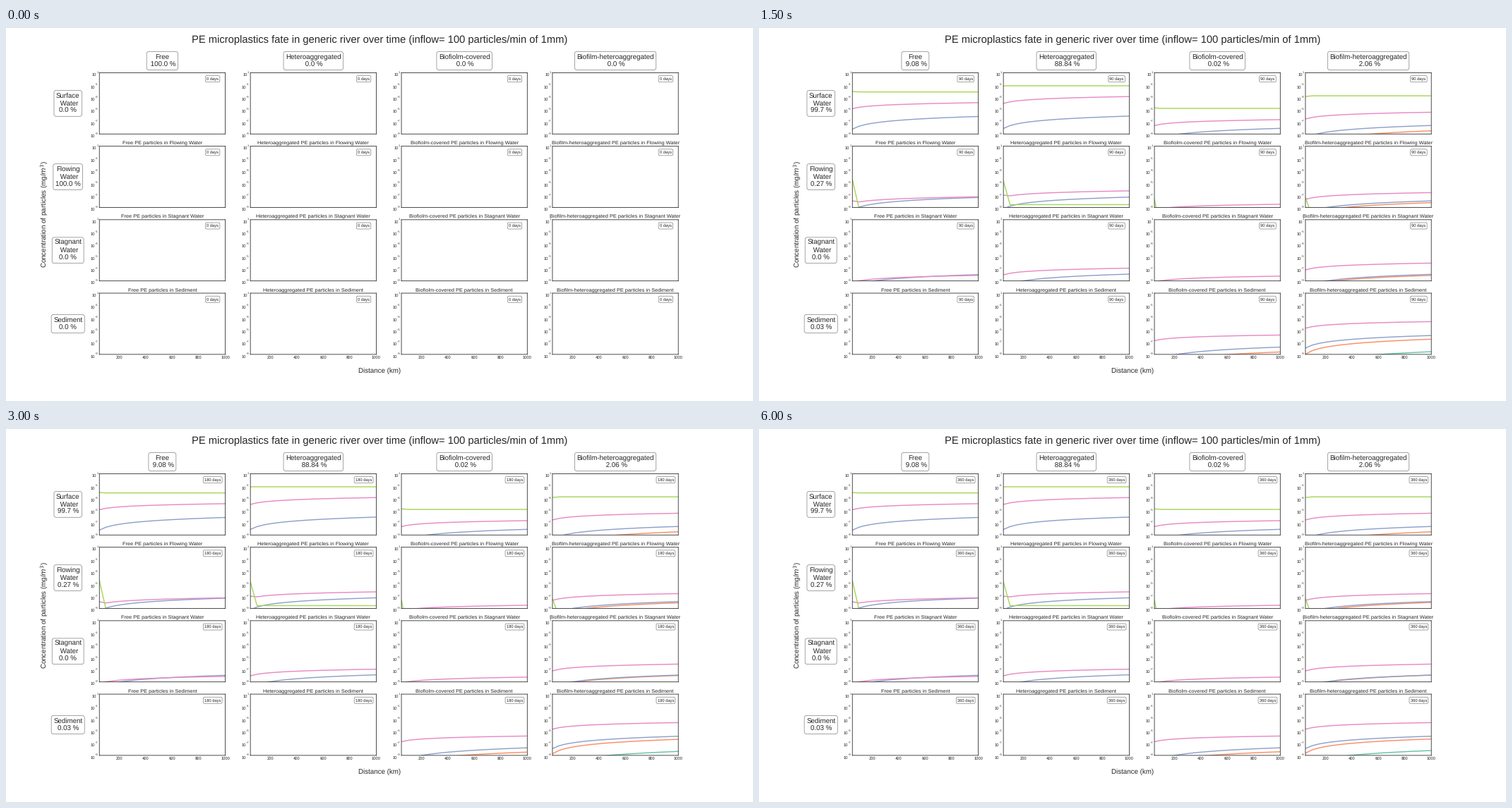
A matplotlib script for the animation above (6500 ms loop, 1058 by 529 pixels).

```python
import numpy as np
import matplotlib.pyplot as plt
from matplotlib.animation import FuncAnimation

plt.rcParams.update({
    "font.family": "Liberation Sans",
    "text.color": "0.15",
    "xtick.labelcolor": "0.15",
    "axes.edgecolor": "0.15",
    "axes.linewidth": 1.0,
    "text.hinting": "none",
    "lines.solid_capstyle": "round",
})

W, H = 1058, 529
DAYS_PER_STEP, STEPS, STEP_MS = 30, 13, 500
KM = np.arange(50, 1001, 50)
DECADES = np.log10(KM / 1000)

COLORS = dict(teal="#66c2a5", orange="#fc8d62", blue="#8da0cb",
              pink="#e78ac3", green="#a6d854")
# Days each size class needs to approach its steady state
TAU = dict(teal=190, orange=93, blue=40)

FORMS = ["Free", "Heteroaggregated", "Biofiolm-covered",
         "Biofilm-heteroaggregated"]
ZONES = ["Surface Water", "Flowing Water", "Stagnant Water", "Sediment"]
# The approach is quicker upstream in water and slower upstream in sediment
UPSTREAM = {"Flowing Water": .5, "Stagnant Water": .5, "Sediment": -.5}
FORM_SHARE = [("100.0", "9.08"), ("0.0", "88.84"), ("0.0", "0.02"),
              ("0.0", "2.06")]
ZONE_SHARE = [("0.0", "99.7"), ("100.0", "0.27"), ("0.0", "0.0"),
              ("0.0", "0.03")]

# log10 concentration: (value at 1000 km, power of distance[, value at 50 km])
CURVES = [
    [dict(blue=(-6.14, 1.59), pink=(-3.89, .75), green=(-2.13, 0, -2.07)),
     dict(blue=(-6.08, 1.55), pink=(-2.89, .86), green=(-1.13, 0)),
     dict(blue=(-8.08, 1.51), pink=(-6.66, .74), green=(-4.82, 0, -4.74)),
     dict(orange=(-8.48, 2.0), blue=(-7.61, 1.6), pink=(-5.45, .84),
          green=(-2.77, 0, -2.88))],
    [dict(blue=(-7.32, 1.6), pink=(-7.26, .84, -7.92),
          green=(-9.15, 0, -4.45)),
     dict(blue=(-7.26, 1.5), pink=(-6.29, .81, -7.0),
          green=(-8.54, 0, -4.68)),
     dict(pink=(-8.48, .69), green=(-12.9, 0, -7.67)),
     dict(orange=(-8.01, 1.8), blue=(-7.88, 1.6), pink=(-6.58, .84),
          green=(-10.5, 0, -7.35))],
    [dict(blue=(-7.92, 1.58), pink=(-8.10, .89)),
     dict(blue=(-7.84, 1.6), pink=(-6.92, .83)),
     dict(pink=(-8.22, .75)),
     dict(orange=(-7.89, 1.7), blue=(-7.88, 1.6), pink=(-6.09, .85))],
    [{},
     {},
     dict(orange=(-8.40, 1.8), blue=(-7.76, 1.8), pink=(-5.84, .71)),
     dict(teal=(-8.14, 1.9), orange=(-6.31, 1.78), blue=(-5.87, 1.55),
          pink=(-3.65, .82))],
]


def profile(end, power, first=None):
    values = end + power * DECADES
    if first is not None:
        values[0] = first
    return values


def boxed(ax, x, y, size):
    box = dict(boxstyle="round,pad=0.3", facecolor="white",
               edgecolor="black", linewidth=.85, alpha=0.5)
    return ax.text(x, y, "", transform=ax.transAxes, fontsize=size,
                   ha="center", va="center", bbox=box)


def power_label(ax, power):
    exponent = str(power).replace("-", "\u2212")
    exponent_width = 4.6 if power < 0 else 2.3
    for text, size, dx, dy in [(exponent, 4.9, 1.8, .5),
                               ("10", 7, 1.8 + exponent_width, 4.7)]:
        ax.annotate(text, (50, power), xytext=(-dx * PX, -dy * PX),
                    textcoords="offset points", fontsize=size,
                    ha="right", va="baseline", annotation_clip=False)


fig, axes = plt.subplots(4, 4, figsize=(18, 9), dpi=W / 18)
PX = 72 / fig.dpi
fig.subplots_adjust(left=.125, right=.9, bottom=.125, top=.88,
                    wspace=.2, hspace=.2)
fig.suptitle("PE microplastics fate in generic river over time "
             "(inflow= 100 particles/min of 1mm)", fontsize=18, y=.981)
fig.text(.5, 1 - 489.4 / H, "Distance (km)", fontsize=12, ha="center")
fig.text(.051, .501, "Concentration of particles (mg/$m^3$)", fontsize=12,
         ha="center", va="center", rotation="vertical")

lines, day_labels = [], []
for r, zone in enumerate(ZONES):
    for c, form in enumerate(FORMS):
        ax = axes[r, c]
        ax.set(xlim=(50, 1000), ylim=(-9, 1), yticks=[],
               xticks=range(200, 1001, 200))
        ax.tick_params(length=0, pad=2 * PX, labelsize=7, labelbottom=r == 3)
        for spine in ax.spines.values():
            spine.set_snap(False)
        for power in range(-9, 2, 2):
            power_label(ax, power)
        if r:
            ax.set_title(f"{form} PE particles in {zone}", fontsize=9,
                         pad=3 * PX)
        for name, color in COLORS.items():
            if name in CURVES[r][c]:
                line, = ax.plot([], [], color=color, lw=1.75, snap=False)
                tau = TAU.get(name) if zone in UPSTREAM else None
                lag = 1 + UPSTREAM.get(zone, 0) * DECADES
                lines.append((line, profile(*CURVES[r][c][name]), tau, lag))
        day_labels.append(boxed(ax, .9, .9, 7))

form_labels = [boxed(ax, .5, 1.196, 12) for ax in axes[0]]
zone_labels = [boxed(ax, -.25, .5, 12) for ax in axes[:, 0]]


def update(step):
    days = step * DAYS_PER_STEP
    started = int(days > 0)
    for line, steady, tau, lag in lines:
        if not started:
            line.set_data([], [])
            continue
        growth = np.log10(1 - np.exp(-days / tau)) if tau else 0
        line.set_data(KM, steady + growth * lag)
    for label in day_labels:
        label.set_text(f"{days} days")
    for label, form, share in zip(form_labels, FORMS, FORM_SHARE):
        label.set_text(f"{form}\n {share[started]} %")
    for label, zone, share in zip(zone_labels, ZONES, ZONE_SHARE):
        label.set_text(zone.replace(" ", "\n ") + f"\n{share[started]} %")
    return []


anim = FuncAnimation(fig, update, frames=STEPS, interval=STEP_MS,
                     repeat=True, repeat_delay=0)
plt.show()
```
